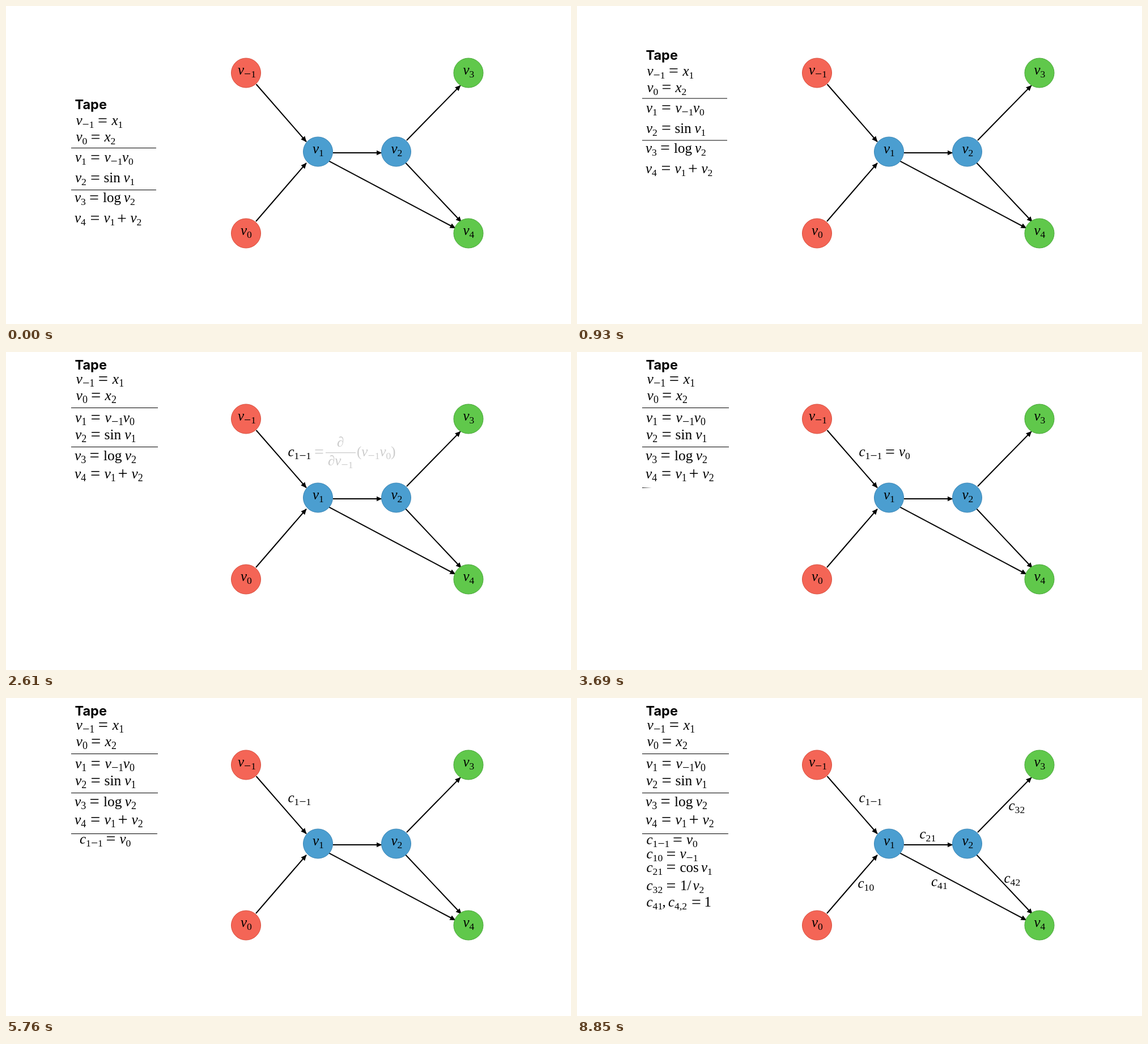
These frames come from a looping animation (997 by 561 pixels, 9.3 s). An HTML page:

```html
<!DOCTYPE html>
<html lang="en">
<head>
<meta charset="utf-8">
<title>Tape and computational graph</title>
<style>
  html, body { margin: 0; width: 100%; height: 100%; overflow: hidden; background: #fff; }
  svg { display: block; width: 997px; height: 561px; }
  text { font-family: "Liberation Serif", "Times New Roman", serif; white-space: pre; }
  .title { font: bold 23.5px Inter, "Liberation Sans", sans-serif; }
  .it { font-style: italic; }
</style>
</head>
<body>
<svg id="stage" viewBox="0 0 997 561">
  <defs>
    <marker id="tip" markerUnits="userSpaceOnUse" markerWidth="12" markerHeight="12"
            refX="9.5" refY="5" orient="auto"><path d="M0 .4L10 5L0 9.6z"/></marker>
  </defs>
</svg>
<script>
const LOOP = 9300, STEP = 30, SIZE = 25, LEFT = 121;
const stage = document.getElementById("stage");
const defs = stage.querySelector("defs");

function el(parent, tag, attrs = {}, text) {
  const node = document.createElementNS("http://www.w3.org/2000/svg", tag);
  for (const key in attrs) node.setAttribute(key, attrs[key]);
  if (text !== undefined) node.textContent = text;
  return parent.appendChild(node);
}
const group = (parent = stage, attrs = {}) => el(parent, "g", attrs);

// One run of maths: "_" starts a subscript, variables are italic.
function run(parent, x, y, source, k = 1) {
  const text = el(parent, "text", { x, y });
  let level = 0;
  const add = (part, size, shift, italic) => {
    el(text, "tspan", {
      dy: shift * k - level, "font-size": size * k, class: italic ? "it" : ""
    }, part);
    level = shift * k;
  };
  for (const token of source.match(/_[\d−,]+|sin|log|cos|./g)) {
    if (token[0] === "_") {
      for (const part of token.slice(1).match(/−|[^−]+/g))
        part === "−" ? add(part, 21.6, 6, false) : add(part, 17.6, 5, false);
    } else if (/[=+]/.test(token)) add(token, 30, 1.5, false);
    else add(token, SIZE, 0, /^[vxc∂]$/.test(token));
  }
}

// A row is written as "run@x run@x ...".
function row(parent, y, source, k = 1) {
  for (const item of source.split(" ")) {
    const [maths, x] = item.split("@");
    run(parent, LEFT + (x - LEFT) * k, y, maths, k);
  }
}

const rule = (parent, y, width) =>
  el(parent, "rect", { x: 115, y: y - 0.5, width, height: 1 });

const TAPE = [
  "v_−1@123.5 =@162 x_1@186.5",
  "v_0@123.5 =@149.5 x_2@173.5",
  "v_1@122 =@149 v_−1@173.5 v_0@205",
  "v_2@122 =@149 sin@172.5 v_1@207.5",
  "v_3@121 =@147 log@171 v_2@208",
  "v_4@121 =@148.5 v_1@172.5 +@196 v_2@219.5"
];

function tape(title, baselines, rules, k) {
  const g = group();
  el(g, "text", { x: 121.5, y: title, class: "title" }, "Tape");
  TAPE.forEach((source, i) => row(g, baselines[i], source, k));
  rules.forEach(y => rule(g, y, 150 * k));
  return g;
}

function graph() {
  const edges = [
    [441.5, 138, 530, 239.5], [441, 380, 530, 277], [577, 259, 663, 259],
    [570, 273.6, 793, 392], [707, 237, 802, 140], [705, 276.5, 803.5, 381]
  ];
  for (const [x1, y1, x2, y2] of edges)
    el(stage, "line", { x1, y1, x2, y2, stroke: "#000", "stroke-width": 2, "marker-end": "url(#tip)" });

  const red = ["#f46556", "#d9503f"], blue = ["#4b9ed0", "#3b86b6"], green = ["#60c84b", "#48a638"];
  const nodes = [
    ["v_−1", 423.5, 118, red, 14.5], ["v_0", 423.5, 401, red, 9.5],
    ["v_1", 550.5, 257, blue, 9.5], ["v_2", 688.5, 257, blue, 9],
    ["v_3", 816, 118, green, 9.5], ["v_4", 816, 401, green, 9.5]
  ];
  for (const [name, cx, cy, [fill, stroke], half] of nodes) {
    el(stage, "circle", { cx, cy, r: 26, fill, stroke });
    run(stage, cx - half, cy + 3, name);
  }
}

// Soft left-to-right reveal of everything drawn in the returned group.
const wipes = [];
function wipe(x, width, from, to) {
  const id = "wipe" + wipes.length;
  const gradient = el(defs, "linearGradient", { id, gradientUnits: "userSpaceOnUse", y1: 0, y2: 0 });
  el(gradient, "stop", { offset: 0 });
  el(gradient, "stop", { offset: 1, "stop-opacity": 0 });
  const g = group(stage, { fill: `url(#${id})` });
  wipes.push({ g, gradient, x, width, from, to, soft: Math.min(18, width / 2) });
  return g;
}
function wipeText(x, y, width, source, from, to) {
  row(wipe(x, width, from, to), y, source);
}

graph();
const first = tape(182, [210, 239, 275, 311, 346, 382], [250.5, 324.5], 1);
const second = tape(31, [56, 85, 124, 154, 191, 223], [98.5, 167.5], 1.02);

const label = group();
run(label, 497.5, 184, "c_1−1");

function derivative(top, topX) {
  const g = group();
  run(g, 544, 184, "=");
  run(g, topX, 167, top);
  el(g, "rect", { x: 564, y: 177, width: 53, height: 1.3 });
  run(g, 568, 200, "∂v_−1");
  return g;
}
const short = derivative("∂v_1", 574);
const long = derivative("∂", 584);
run(long, 619, 184, "(v_−1v_0)");

const value = group();
row(value, 184, "=@544 v_0@568");
const flyer = group();
row(flyer, 184, "c_1−1@497.5 =@544 v_0@568");

rule(wipe(115, 152, 3600, 4500), 239.5, 152);
wipeText(123, 283, 90, "c_10@122.5 =@157.5 v_−1@181.5", 6060, 6510);
wipeText(495, 335, 30, "c_10@495.5", 6060, 6510);
wipeText(123, 306.5, 116, "c_21@122.5 =@157.5 cos@181.5 v_1@219", 7050, 7500);
wipeText(604, 247.5, 30, "c_21@604.5", 7590, 8040);
wipeText(123, 339, 102, "c_32@122.5 =@157.5 1/@182 v_2@204.5", 7590, 8040);
wipeText(761, 198, 30, "c_32@761.5", 7590, 8040);
wipeText(123, 368, 113, "c_41@122.5 ,@150.5 c_4,2@161 =@202 1@224.5", 8400, 8850);
wipeText(625, 331.5, 30, "c_41@625", 8400, 8850);
wipeText(753, 325.5, 30, "c_42@753.5", 8400, 8850);

const ramp = (t, from, to) => Math.min(1, Math.max(0, (t - from) / (to - from)));
const ease = p => p < 0.5 ? 2 * p * p : 1 - 2 * (1 - p) ** 2;
const show = (g, opacity) => {
  g.style.display = opacity > 0 ? "" : "none";
  g.style.opacity = opacity;
};
const move = (g, x, y) => g.setAttribute("transform", `translate(${x} ${y})`);

function draw(t) {
  const swapped = t >= 1830, flying = t >= 4980;
  show(first, +!swapped);
  show(second, +swapped);
  show(label, +swapped);
  move(first, 0, -155 * ease(ramp(t, 450, 1350)));

  show(short, swapped ? 1 - ramp(t, 2250, 2400) : 0);
  show(long, ramp(t, 2580, 2730) * (1 - ramp(t, 3150, 3270)));
  show(value, flying ? 0 : ramp(t, 3420, 3540));

  show(flyer, +flying);
  const p = ease(ramp(t, 4950, 5850));
  move(flyer, -375 * p, 74 * p);

  for (const w of wipes) {
    const p = ramp(t, w.from, w.to);
    show(w.g, +(p > 0));
    const edge = w.x + (w.width + w.soft) * p;
    w.gradient.setAttribute("x1", edge - w.soft);
    w.gradient.setAttribute("x2", edge);
  }
}

function tick() {
  const t = performance.now() % LOOP;
  draw(Math.floor(t / STEP) * STEP);
  requestAnimationFrame(tick);
}
tick();
</script>
</body>
</html>
```
